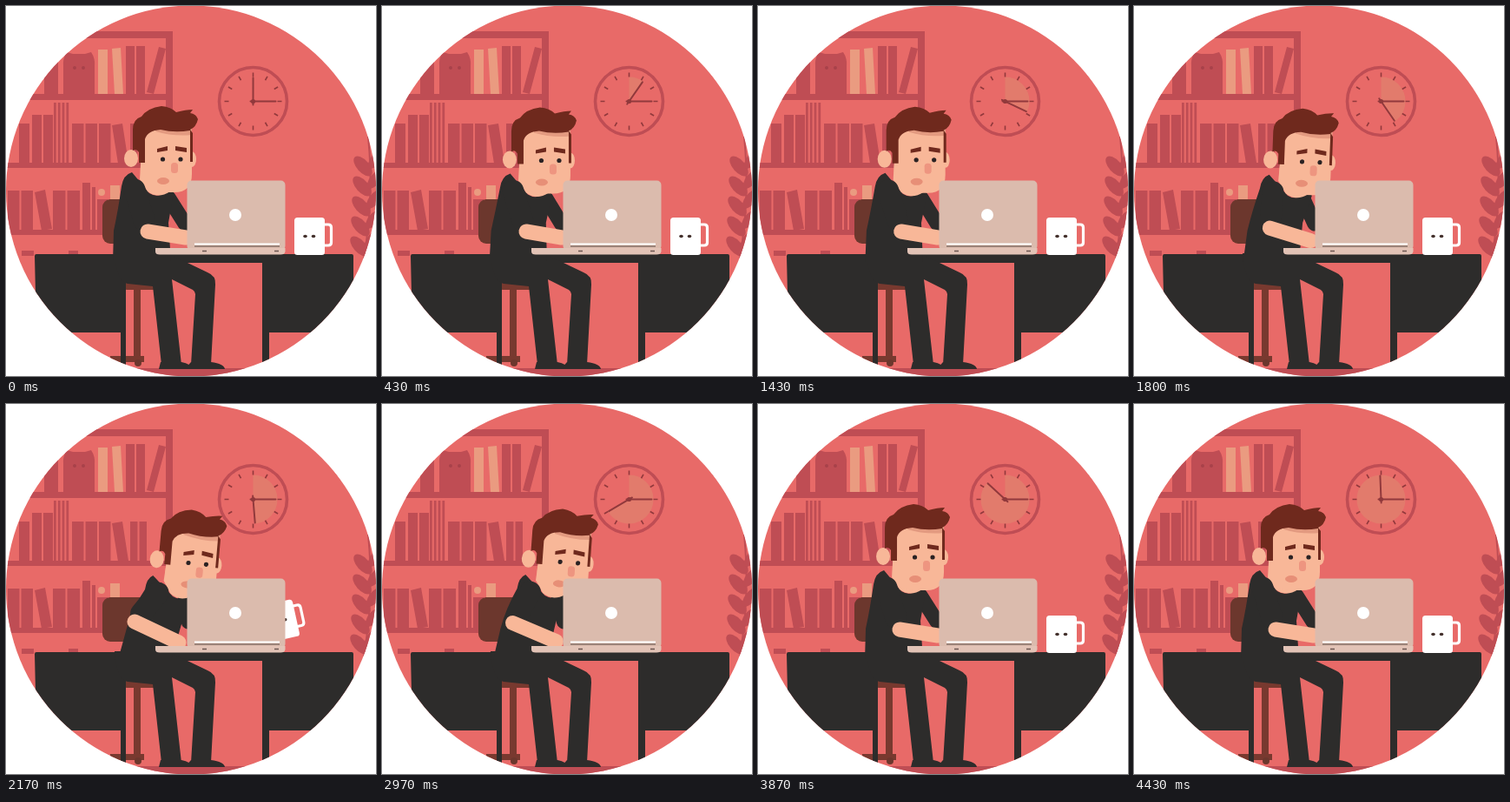
An HTML page for the animation above (4460 ms loop, 426 px wide and 425 px high).

```html
<!DOCTYPE html>
<html lang="en">
<head>
<meta charset="utf-8">
<title>Desk work</title>
<style>
  html, body { margin: 0; width: 100%; height: 100%; overflow: hidden; background: #fff; }
  svg { display: block; width: 100vw; height: 100vh; }
  .shade { fill: #bf4d54; }
  .tan { fill: #ea9b80; }
  .desk, .cloth { fill: #2d2c2b; }
  .skin { fill: #f8b798; }
  .hair { fill: #6f291d; }
  .chair { fill: #6c372d; }
  .post { fill: #78392f; }
  .sleeve { fill: none; stroke: #2d2c2b; stroke-linecap: round; }
  .limb { fill: none; stroke: #f8b798; stroke-linecap: round; }
</style>
</head>
<body>
<svg viewBox="0 0 426 425" preserveAspectRatio="none">
  <defs><clipPath id="port"><circle cx="213" cy="212.5" r="213"/></clipPath></defs>
  <g clip-path="url(#port)">
    <rect width="426" height="425" fill="#e86a68"/>
    <path class="shade" d="M100 416h226v9h-226z"/>

    <!-- shelves -->
    <path class="shade" d="M0 29h192v8H0zM184 29h8v185h-8zM0 101h192v7H0zM0 180h186v6H0zM0 257h186v6H0z"/>
    <path id="books" class="shade"/>
    <path class="shade" d="M162 99L176 47L184 49L170 101zM122 137L134 135L141 180L129 181zM33 214L45 211L53 256L41 258z"/>
    <path class="shade" d="M66 101V70Q65 60 70 53L77 55H91L98 53Q103 60 102 70V101z"/>
    <path class="tan" d="M106 50h11v51h-11zM122 49l10-1 3 53h-10zM120 206h11v16h-11z"/>
    <circle class="tan" cx="110" cy="214" r="4"/>
    <g fill="#a8414a"><circle cx="79" cy="71" r="2"/><circle cx="89" cy="71" r="2"/></g>

    <!-- plant -->
    <path d="M417 150Q424 220 412 290" fill="none" stroke="#bf4d54" stroke-width="2"/>
    <g id="leaves" class="shade"></g>

    <!-- clock -->
    <g transform="translate(284.5 109.5)">
      <circle id="sweep" r="14" fill="none" stroke="#dd8c70" stroke-opacity=".5" stroke-width="28"
              pathLength="360" transform="rotate(-90)"/>
      <circle r="39" fill="none" stroke="#bf4d54" stroke-width="3.6"/>
      <g id="ticks" stroke="#91393c" stroke-width="1.6"></g>
      <g stroke="#91393c" stroke-width="2" stroke-linecap="round">
        <path d="M-3 0H26"/>
        <path id="minute" d="M0 4V-27"/>
      </g>
      <circle r="2.6" fill="#91393c"/>
    </g>

    <!-- chair and desk -->
    <rect class="chair" x="111" y="222" width="54" height="51" rx="9"/>
    <path class="post" d="M147 322h8v82h-8zM120 402h39v7h-39z"/>
    <rect class="post" x="136" y="317" width="38" height="9" rx="3"/>
    <circle class="chair" cx="152" cy="410" r="4"/>
    <path class="desk" d="M33 287q0-2 2-2H398q2 0 2 2V375H303V425H295V295H138V425H132V375H35z"/>

    <!-- legs -->
    <path class="cloth" d="M125 284H186L232 306Q242 310 241 320L236 412H213L218 331Q218 328 215 326L191 314L202 412H179L169 322L140 319Q127 316 125 284z"/>
    <path class="cloth" d="M178 409H202Q213 411 214 417H176zM213 409H236Q251 411 252 417H206z"/>

    <!-- body -->
    <path id="farSleeve" class="sleeve" stroke-width="17"/>
    <path id="torso" class="cloth"/>
    <g id="head">
      <path class="skin" d="M155 182H189V213Q175 222 163 213L154 199z"/>
      <ellipse class="skin" cx="144" cy="175" rx="8" ry="10"/>
      <ellipse class="skin" cx="214" cy="176" rx="5" ry="9"/>
      <path class="skin" d="M155 138H214V193Q214 214 194 214H178Q155 212 155 190z"/>
      <path d="M172 141H214V148Q192 150 172 144z" fill="#e39a80"/>
      <path class="hair" d="M146 166V142Q146 130 156 127Q163 117 179 115Q190 116 196 122Q207 119 215 119L212 123Q219 124 221 130Q219 139 212 142L215 146V179H212V143Q194 146 178 142Q163 143 160 153V180H153V168Q150 163 146 166z"/>
      <path class="hair" d="M174 164L186 161V166L174 168zM195 161L208 163V168L195 166z"/>
      <g fill="#2a2223"><circle cx="180.5" cy="176" r="2.6"/><circle cx="201" cy="176" r="2.6"/></g>
      <rect x="190" y="180" width="8" height="12" rx="3.5" fill="#ee9580"/>
      <ellipse cx="181" cy="201" rx="7" ry="4" fill="#e78f77"/>
    </g>
    <path id="nearSleeve" class="sleeve" stroke-width="25"/>
    <path id="nearArm" class="limb" stroke-width="17"/>

    <path id="farArm" class="limb" stroke-width="13"/>
    <g id="mug">
      <path d="M365 251h6q3.500 0 3.500 3.500v17q0 3.500-3.500 3.500h-6" fill="none" stroke="#fff" stroke-width="3.2"/>
      <rect x="332" y="243" width="35" height="43" rx="3.500" fill="#fff"/>
      <g fill="#43302c"><ellipse cx="344.500" cy="264.500" rx="2.300" ry="1.700"/><ellipse cx="354" cy="264.500" rx="2.300" ry="1.700"/></g>
    </g>

    <!-- laptop -->
    <rect x="208.500" y="200.500" width="113" height="80" rx="5" fill="#dbbbad"/>
    <circle cx="264" cy="240" r="7" fill="#fff"/>
    <path d="M217 273.500H315" stroke="#fff" stroke-width="2"/>
    <path d="M217 276H315" stroke="#5b4a45"/>
    <path d="M172 278H321.500V282Q321 285.500 316 285.500H177Q172 285.500 172 282z" fill="#e2c3b6"/>
    <path d="M226 281.500h5M309 281.500h5" stroke="#6b5650" stroke-width="1.500"/>
  </g>
</svg>
<script>
const LOOP = 4460;
const $ = id => document.getElementById(id);
const set = (id, name, value) => $(id).setAttribute(name, value);
const repeat = (n, make) => Array.from({ length: n }, (_, i) => make(i)).join('');

// A run of equal books standing on a shelf.
const run = (x, base, height, width, count) =>
  repeat(count, i => `M${x + i * (width + 2)} ${base}v${-height}h${width}v${height}z`);

set('books', 'd',
  run(44, 101, 46, 16, 1) + run(138, 101, 55, 10, 2) +
  run(15, 180, 45, 12, 1) + run(30, 180, 55, 11, 2) + run(55, 180, 69, 2.8, 4) +
  run(76, 180, 45, 13.5, 3) + run(143, 180, 45, 8.5, 2) +
  run(2, 257, 45, 13.5, 2) + run(54, 257, 45, 14.5, 2) + run(88, 257, 54, 9, 1) +
  run(99, 257, 49, 4, 1) + run(105, 257, 35, 12, 2) +
  run(18, 287, 6, 14, 1) + run(72, 287, 6, 11, 1));

$('leaves').innerHTML = repeat(5, i =>
  `<ellipse rx="14" ry="7" transform="translate(${411 - i} ${184 + i * 23}) rotate(48)"/>
   <ellipse rx="13" ry="6" transform="translate(${426 - i} ${176 + i * 23}) rotate(-52)"/>`);
$('ticks').innerHTML = repeat(12, i => `<path d="M0-33V-28" transform="rotate(${i * 30})"/>`);

// Smooth step from 0 to 1 between two times.
function rise(t, from, to) {
  const u = Math.min(1, Math.max(0, (t - from) / (to - from)));
  return u * u * (3 - 2 * u);
}
// Up over [a, b], down again over [c, d].
const pulse = (t, a, b, c, d) => rise(t, a, b) - rise(t, c, d);

function draw(now) {
  const t = now % LOOP, angle = t / LOOP * 360;
  set('minute', 'transform', `rotate(${angle})`);
  set('sweep', 'stroke-dasharray', `${angle} 400`);

  const lean = pulse(t, 1640, 1990, 2650, 3900);
  const sip = pulse(t, 2200, 2420, 2720, 2960);
  const sway = t < 1740 ? Math.sin(Math.PI * t / 1740) ** 2 : 0;

  // Head and trunk
  const x = 27 * lean - 20 * sip + 6 * sway;
  const y = 6 * lean - 18 * sip + 3 * sway;
  set('head', 'transform', `translate(${x} ${y}) rotate(${5 * lean - 18 * sip} 176 205)`);
  set('torso', 'd',
    `M${145 + x * .9} ${191 + y}Q${135 + x} ${194 + y} ${133 + x} ${207 + y}` +
    `Q${129 + x * .6} 235 ${124 + x * .55} 258L${123 + x * .22} 294H190` +
    `L${187 + x * .6} 249L${193 + x} ${215 + y}L${188 + x} ${211 + y}` +
    `Q${176 + x} ${222 + y} ${165 + x} ${215 + y}z`);
  set('farSleeve', 'd', `M${187 + x * .7} ${220 + y}L${206 + x * .15} 250`);

  // Typing arm
  const sx = 148 + x, sy = 211 + y;
  const ex = 163 - 15 * lean + 6 * sway, ey = 259 - 9 * lean;
  set('nearSleeve', 'd', `M${sx} ${sy}L${sx + (ex - sx) * .72} ${sy + (ey - sy) * .72}`);
  set('nearArm', 'd', `M${ex} ${ey}L${207 - 8 * lean} ${266 + 8 * lean}`);

  // Mug and the hand that fetches it
  const reach = pulse(t, 1640, 1950, 3180, 3400);
  const drag = pulse(t, 2060, 2400, 2740, 3180);
  const mx = -131 * drag, my = -62 * drag;
  set('mug', 'transform', `translate(${mx} ${my}) rotate(${-50 * drag} 349 264)`);
  set('farArm', 'd', `M238 262l${(94 + mx) * reach} ${(4 + my) * reach}`);
}

function tick() {
  draw(performance.now());
  requestAnimationFrame(tick);
}
tick();
</script>
</body>
</html>
```
